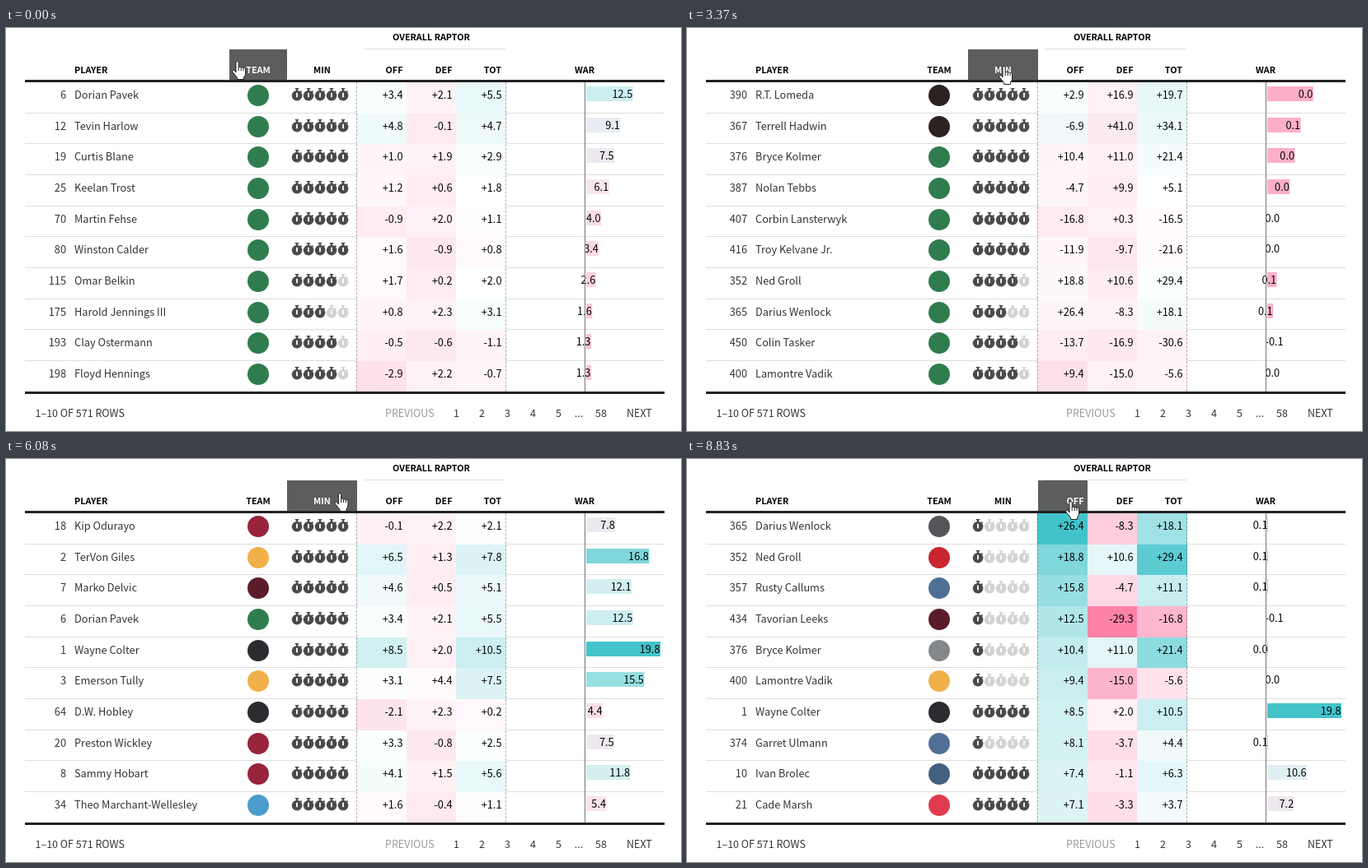
Write an HTML page that moves like this. It is 819 px wide and 490 px high and loops after 9030 ms.

```html
<!DOCTYPE html>
<html lang="en">
<head>
<meta charset="utf-8">
<title>Player ratings table</title>
<style>
html, body { margin: 0; width: 100%; height: 100%; overflow: hidden; background: #fff; }
svg { display: block; font: 12.75px "Noto Sans CJK JP", "Noto Sans CJK SC", "Noto Sans CJK", "Open Sans", sans-serif; }
text { fill: #333; white-space: pre; }
.num { fill: #000; }
.head { font-size: 10.8px; font-weight: 700; fill: #000; }
.foot { font-size: 12.5px; fill: #333; }
.end { text-anchor: end; }
.mid { text-anchor: middle; }
</style>
</head>
<body>
<svg id="stage" width="819" height="490" viewBox="0 0 819 490"></svg>
<script>
const LOOP = 9030, FADE = 1000, ROWS = 10, TOP = 66, PITCH = 37.66;
const stage = document.getElementById('stage');

const teams = {
  bos: '#2f7d4f', was: '#2f4468', cle: '#2b2320', sas: '#85888b', min: '#24507f',
  lal: '#f2b04a', chi: '#c9252f', bkn: '#55565a', phx: '#261f2c', mia: '#98243c',
  tor: '#5a1c28', hou: '#2c2b30', okc: '#4c9ccb', uta: '#1f3b63', cha: '#2c6b86',
  nop: '#26355a', sac: '#6d62a2', mem: '#4f6f96', dal: '#44607f', atl: '#e03a4e'
};

// rank | name | team | off | def | tot | war | minutes
const table = text => text.trim().split('\n').map(line => {
  const [rank, name, team, ...rest] = line.trim().split('|');
  const [off, def, tot, war, min] = rest.map(Number);
  return { rank, name, team, rating: [off, def, tot], war, min };
});

const teamUp = table(`
  6|Dorian Pavek|bos|3.4|2.1|5.5|12.5|5
  12|Tevin Harlow|bos|4.8|-0.1|4.7|9.1|5
  19|Curtis Blane|bos|1.0|1.9|2.9|7.5|5
  25|Keelan Trost|bos|1.2|0.6|1.8|6.1|5
  70|Martin Fehse|bos|-0.9|2.0|1.1|4.0|5
  80|Winston Calder|bos|1.6|-0.9|0.8|3.4|5
  115|Omar Belkin|bos|1.7|0.2|2.0|2.6|4
  175|Harold Jennings III|bos|0.8|2.3|3.1|1.6|3
  193|Clay Ostermann|bos|-0.5|-0.6|-1.1|1.3|4
  198|Floyd Hennings|bos|-2.9|2.2|-0.7|1.3|4`);
const teamDown = table(`
  553|Ansel Rudwick|was|-6.2|-1.9|-8.1|-0.9|3
  541|Jerome Tolland|was|-2.4|-1.8|-4.2|-0.7|4
  528|Miles Varley|was|-2.0|-3.4|-5.4|-0.6|5
  512|Trent Oakham|was|-2.3|-2.5|-4.8|-0.4|5
  489|Andre Selkirk|was|-1.8|-2.0|-3.8|-0.2|3
  460|Jude Farrow|was|-16.0|5.9|-10.1|-0.1|1
  431|Rafe Benning|was|-1.7|-2.0|-3.7|-0.1|3
  370|Garth Milbury|was|-5.6|1.5|-4.1|0.1|2
  358|Ian Castleby|was|-1.2|1.0|-0.2|0.1|2
  318|Moritz Kehl|was|-2.0|0.6|-1.4|0.4|2`);
const minUp = table(`
  390|R.T. Lomeda|cle|2.9|16.9|19.7|0.04|1
  367|Terrell Hadwin|cle|-6.9|41.0|34.1|0.1|1
  376|Bryce Kolmer|sas|10.4|11.0|21.4|0.04|1
  387|Nolan Tebbs|min|-4.7|9.9|5.1|0.04|1
  407|Corbin Lansterwyk|min|-16.8|0.3|-16.5|0|1
  416|Troy Kelvane Jr.|lal|-11.9|-9.7|-21.6|0|1
  352|Ned Groll|chi|18.8|10.6|29.4|0.1|1
  365|Darius Wenlock|bkn|26.4|-8.3|18.1|0.1|1
  450|Colin Tasker|phx|-13.7|-16.9|-30.6|-0.1|1
  400|Lamontre Vadik|lal|9.4|-15.0|-5.6|0|1`);
const minDown = table(`
  18|Kip Odurayo|mia|-0.1|2.2|2.1|7.8|5
  2|TerVon Giles|lal|6.5|1.3|7.8|16.8|5
  7|Marko Delvic|tor|4.6|0.5|5.1|12.1|5
  6|Dorian Pavek|bos|3.4|2.1|5.5|12.5|5
  1|Wayne Colter|hou|8.5|2.0|10.5|19.8|5
  3|Emerson Tully|lal|3.1|4.4|7.5|15.5|5
  64|D.W. Hobley|hou|-2.1|2.3|0.2|4.4|5
  20|Preston Wickley|mia|3.3|-0.8|2.5|7.5|5
  8|Sammy Hobart|mia|4.1|1.5|5.6|11.8|5
  34|Theo Marchant-Wellesley|okc|1.6|-0.4|1.1|5.4|5`);
const offUp = table(`
  476|Vincent Aldous|hou|-20.8|-8.8|-29.6|-0.2|1
  407|Corbin Lansterwyk|min|-16.8|0.3|-16.5|0|1
  414|Ellison Rook|uta|-15.4|7.1|-8.3|0|1
  441|Sam Dreaney|cha|-14.4|6.3|-8.0|-0.1|1
  450|Colin Tasker|phx|-13.7|-16.9|-30.6|-0.1|1
  458|Neil Fenn|nop|-12.8|-0.2|-13.1|-0.1|1
  466|Jonah Pettigan|sac|-12.1|-3.2|-15.3|-0.2|1
  416|Troy Kelvane Jr.|lal|-11.9|-9.7|-21.6|0|1
  428|Elijah Tovy|okc|-11.8|-2.7|-14.5|-0.1|1
  395|Perry Lunox|mia|-11.1|7.6|-3.5|0|1`);
const offDown = table(`
  365|Darius Wenlock|bkn|26.4|-8.3|18.1|0.1|1
  352|Ned Groll|chi|18.8|10.6|29.4|0.1|1
  357|Rusty Callums|mem|15.8|-4.7|11.1|0.1|1
  434|Tavorian Leeks|tor|12.5|-29.3|-16.8|-0.1|1
  376|Bryce Kolmer|sas|10.4|11.0|21.4|0.04|1
  400|Lamontre Vadik|lal|9.4|-15.0|-5.6|0|1
  1|Wayne Colter|hou|8.5|2.0|10.5|19.8|5
  374|Garret Ulmann|mem|8.1|-3.7|4.4|0.1|1
  10|Ivan Brolec|dal|7.4|-1.1|6.3|10.6|5
  21|Cade Marsh|atl|7.1|-3.3|3.7|7.2|5`);

const sorts = [
  { at: -FADE, rows: teamUp }, { at: 600, rows: teamDown }, { at: 2040, rows: teamUp },
  { at: 3340, rows: minUp, logoLag: 100 }, { at: 4970, rows: minDown },
  { at: 6470, rows: offUp }, { at: 7840, rows: offDown }
];

// time, x, y
const cursorPath = [
  [0, 274, 40], [70, 273.5, 42], [270, 275, 43], [340, 278, 43], [1380, 278, 43], [1450, 279, 43],
  [1660, 281, 42], [1730, 284, 42], [2000, 284, 42], [2130, 286, 42], [3170, 286, 42],
  [3240, 345, 45], [3370, 378, 46], [5740, 378, 46], [5800, 380, 45], [6150, 403, 40],
  [6290, 403, 40], [6360, 437, 45], [7740, 437, 45], [8300, 455, 48], [8680, 459, 49],
  [8760, 459, 50], [8830, 459, 51], [LOOP, 459, 51]
];

const warStops = [
  [0, [253, 174, 200]], [3, [253, 215, 227]], [6, [248, 230, 238]], [8, [234, 234, 240]],
  [10, [229, 239, 243]], [12.2, [210, 239, 241]], [15.5, [152, 223, 226]], [19.8, [68, 195, 203]]
];

const lerp = (a, b, p) => a + (b - a) * p;
const mix = (a, b, p) => a.map((v, i) => lerp(v, b[i], p));
const rgb = c => `rgb(${c.map(Math.round)})`;

function along(stops, x) {
  const i = Math.max(1, stops.findIndex(s => s[0] >= x));
  const [x0, ...a] = stops[i - 1].flat(), [x1, ...b] = stops[i].flat();
  return mix(a, b, (x - x0) / (x1 - x0));
}

// CSS "ease": cubic-bezier(.25, .1, .25, 1)
function ease(x) {
  if (x >= 1) return 1;
  let lo = 0, hi = 1, s = .5;
  for (let i = 0; i < 18; i++) {
    s = (lo + hi) / 2;
    if (.75 * s * (1 - s) + s ** 3 < x) lo = s; else hi = s;
  }
  return .3 * s * (1 - s) ** 2 + 3 * s * s * (1 - s) + s ** 3;
}

const ranges = [[-20.8, 26.4], [-29.3, 41], [-30.6, 34.1]];
const WHITE = [255, 255, 255], PINK = [252, 130, 168], TEAL = [66, 195, 202];
const DARK = [74, 74, 74], LIGHT = [211, 211, 211];

function heat(value, column) {
  const [min, max] = ranges[column];
  const f = (value - (min + max) / 2) / ((max - min) / 2);
  return mix(WHITE, f < 0 ? PINK : TEAL, Math.abs(f));
}
const watchColor = (row, k) => k < row.min ? DARK : LIGHT;
const signed = v => (v > 0 ? '+' : '') + v.toFixed(1);

function add(tag, attrs, parent = stage) {
  const el = document.createElementNS('http://www.w3.org/2000/svg', tag);
  for (const key in attrs) el.setAttribute(key, attrs[key]);
  return parent.appendChild(el);
}
function label(x, y, cls, content = '') {
  const el = add('text', { x, y, class: cls });
  el.textContent = content;
  return el;
}
const box = (x, y, width, height, fill) => add('rect', { x, y, width, height, fill });
const line = (x1, y1, x2, y2, stroke, extra) => add('line', { x1, y1, x2, y2, stroke, ...extra });

const hovers = [
  { from: 0, to: 3240, x: 271, w: 70, tx: 306, cls: 'mid', name: 'TEAM' },
  { from: 3240, to: 6350, x: 341, w: 85, tx: 383.5, cls: 'mid', name: 'MIN' },
  { from: 6350, to: LOOP, x: 426, w: 60, tx: 481.5, cls: 'end', name: 'OFF' }
];
for (const h of hovers) {
  h.rect = box(h.x, 26, h.w, 38, '#5b5d5e');
  h.text = label(h.tx, 55, 'head ' + h.cls, h.name);
}
label(516, 15, 'head mid', 'OVERALL RAPTOR');
line(434, 25.5, 606, 25.5, '#ddd');
label(83, 55, 'head', 'PLAYER');
label(541.5, 55, 'head end', 'DEF');
label(601, 55, 'head end', 'TOT');
label(702, 55, 'head mid', 'WAR');

const WATCH = 'M-2.3-8h4.6v1.6h-1.3v1.3a6.2 6.2 0 0 1 2.9 1.2l1-1 1.2 1.2-1 1a6.3 6.3 0 1 1-6.1-2.4v-1.3h-1.3z' +
  'M-.9-2.2v5.4h1.8v-5.4z';

const views = Array.from({ length: ROWS }, (_, i) => {
  const y = Math.round(TOP + i * PITCH), next = Math.round(TOP + (i + 1) * PITCH), base = y + 20;
  if (i < ROWS - 1) line(23, next - .5, 799, next - .5, '#ddd');
  // The outer cells also fill the space under their dashed borders.
  const cells = [[425, 61], [486, 60], [546, 61]].map(([x, w]) => box(x, y, w, next - y));
  for (const x of [425.5, 606.5]) line(x, y, x, next - 1, '#000', { 'stroke-opacity': .3, 'stroke-dasharray': '3 1.86' });
  return {
    cells,
    bar: box(704, y + 5, 0, 18),
    rank: label(73, base, 'end'),
    name: label(83, base, ''),
    logo: add('circle', { cx: 306, cy: y + 16, r: 13 }),
    watches: [0, 1, 2, 3, 4].map(k => add('path',
      { d: WATCH, 'fill-rule': 'evenodd', transform: `translate(${353 + 14 * k} ${y + 15})` })),
    ratings: [0, 1, 2].map(k => label(481.5 + 60 * k, base, 'num end')),
    war: label(702, base - 1, 'num')
  };
});

line(702.5, 66, 702.5, 442, '#777');
box(23, 63, 776, 3, '#222');
box(23, 442, 776, 3, '#222');

label(35.5, 473, 'foot', '1–10 OF 571 ROWS');
label(460, 473, 'foot', 'PREVIOUS').style.fill = '#999';
['1', '2', '3', '4', '5', '...', '58'].forEach((page, i) =>
  label([546.5, 577.5, 608.5, 639.5, 670.5, 695, 722][i], 473, 'foot mid', page));
label(753, 473, 'foot', 'NEXT');

const cursor = add('path', {
  d: 'M5 14V2.2a1.6 1.6 0 0 1 3.2 0V8a1.6 1.4 0 0 1 3 .4a1.6 1.4 0 0 1 2.8 .6a1.5 1.4 0 0 1 2.6 .9' +
    'V15q0 3-2 5v2.5H6.6v-2L1 13.5q-1-2 .8-2.4q1.2-.2 3.2 2.9zM8.2 8v4M11.2 8.6v3.6M14 9.2v3',
  fill: '#fff', stroke: '#222', 'stroke-width': 1, 'stroke-linejoin': 'round'
});

const set = (el, key, value) => el.setAttribute(key, value);

function drawRow(view, row, old, p, team) {
  view.rank.textContent = row.rank;
  view.name.textContent = row.name;
  set(view.logo, 'fill', teams[team]);
  view.watches.forEach((el, k) => set(el, 'fill', rgb(mix(watchColor(old, k), watchColor(row, k), p))));
  row.rating.forEach((value, k) => {
    view.ratings[k].textContent = signed(value);
    set(view.cells[k], 'fill', rgb(mix(heat(old.rating[k], k), heat(value, k), p)));
  });
  // Widths only animate when a bar was already there.
  const hasBar = row.war > 0;
  const amount = hasBar && old.war > 0 ? lerp(old.war, row.war, p) : row.war;
  const width = hasBar ? Math.max(1, amount / 19.8 * 90) : 0;
  set(view.bar, 'width', width);
  set(view.bar, 'fill', rgb(along(warStops, Math.max(0, row.war))));
  view.war.textContent = row.war.toFixed(1);
  set(view.war, 'x', hasBar ? 703.5 + width : 701.5);
  set(view.war, 'class', hasBar ? 'num end' : 'num');
}

function draw(t) {
  const now = sorts.findLastIndex(s => s.at <= t);
  const { at, rows, logoLag = 0 } = sorts[now];
  const before = sorts[Math.max(0, now - 1)].rows;
  const p = ease((t - at) / FADE);
  views.forEach((view, i) => {
    const stale = i > 1 && t - at < logoLag;
    drawRow(view, rows[i], before[i], p, (stale ? before : rows)[i].team);
  });
  for (const h of hovers) {
    const on = t >= h.from && t < h.to;
    set(h.rect, 'visibility', on ? 'visible' : 'hidden');
    h.text.style.fill = on ? '#fff' : '#000';
  }
  set(cursor, 'transform', `translate(${along(cursorPath, t)})`);
}

let start;
function tick(time) {
  start ??= time;
  draw((time - start) % LOOP);
  requestAnimationFrame(tick);
}
draw(0);
requestAnimationFrame(tick);
</script>
</body>
</html>
```
